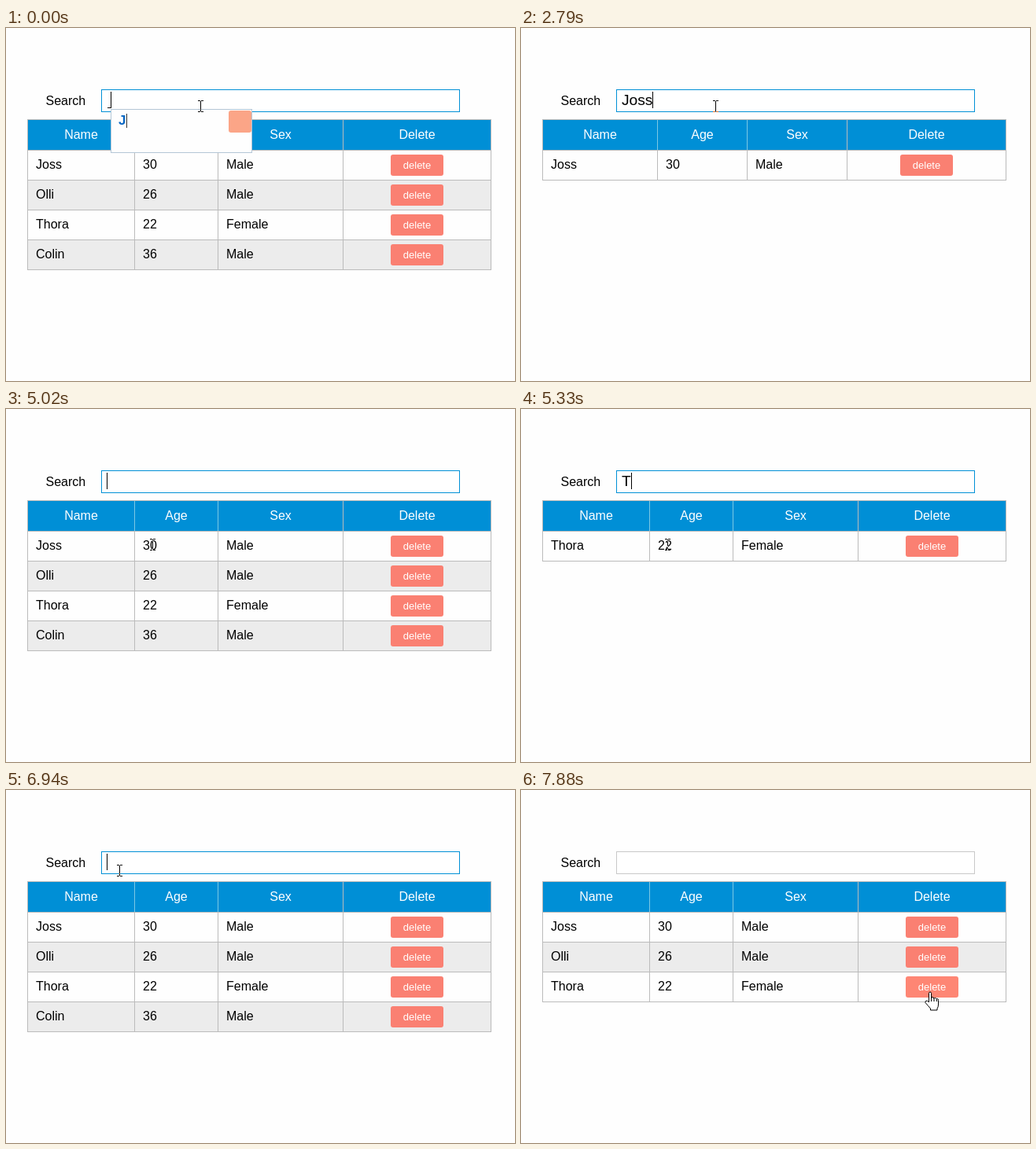
An HTML page for the animation above (8 s loop, 647 by 449 pixels).

```html
<!DOCTYPE html>
<html lang="en">
<head>
<meta charset="utf-8">
<title>Table search</title>
<style>
html, body { margin: 0; width: 100%; height: 100%; overflow: hidden; background: #fefefe; }
svg { display: block; font: 16px "Liberation Sans", Arial, sans-serif; }
.query { font-size: 19.2px; white-space: pre; }
.button { font-size: 13px; fill: #fff; text-anchor: middle; }
.head { fill: #fff; text-anchor: middle; }
.beam { mix-blend-mode: difference; fill: #fff; }
</style>
</head>
<body>
<svg id="stage" width="647" height="449"></svg>
<script>
const LOOP = 8000;
const stage = document.getElementById('stage');
const people = [
  ['Joss', 30, 'Male'],
  ['Olli', 26, 'Male'],
  ['Thora', 22, 'Female'],
  ['Colin', 36, 'Male']
];
const WIDE = [27, 163, 269, 428, 616];
const NARROW = [27, 173, 287, 414, 616];

// Each step overrides part of the state before it.
const steps = [
  [0, { text: ' ', pending: true, popup: true, caret: true, focus: true, selected: false,
        removed: false, cursor: 'beam', x: 247, y: 99 }],
  [410, { text: 'J', popup: false }],
  [560, { pending: false }],
  [840, { text: 'Jo' }],
  [1150, { text: 'Jos' }],
  [1710, { caret: false }],
  [2230, { caret: true }],
  [2790, { text: 'Joss' }],
  [3320, { caret: false }],
  [3460, { text: 'Jos', caret: true }],
  [3600, { text: 'Jo' }],
  [3740, { text: 'J' }],
  [3890, { text: '' }],
  [4170, { x: 243, y: 108 }],
  [4310, { x: 226, y: 140 }],
  [4450, { x: 208, y: 170, caret: false }],
  [4590, { x: 196, y: 185 }],
  [4730, { x: 190, y: 180 }],
  [4880, { x: 187, y: 175 }],
  [5020, { x: 186, y: 172, caret: true }],
  [5330, { text: 'T' }],
  [5480, { x: 180, y: 150 }],
  [5620, { x: 168, y: 118 }],
  [5760, { x: 155, y: 96 }],
  [5890, { x: 145, y: 90 }],
  [6030, { x: 142, y: 88 }],
  [6150, { x: 137, y: 84 }],
  [6270, { x: 131, y: 80, selected: true, caret: false }],
  [6390, { x: 110, y: 88 }],
  [6510, { x: 94, y: 96 }],
  [6940, { x: 144, y: 102, text: '', selected: false, caret: true }],
  [7070, { cursor: 'arrow', x: 220, y: 135 }],
  [7210, { x: 330, y: 180 }],
  [7340, { x: 430, y: 230 }],
  [7480, { cursor: 'hand', x: 500, y: 278, caret: false }],
  [7610, { x: 518, y: 285 }],
  [7750, { x: 521, y: 282, focus: false }],
  [7880, { x: 520, y: 257, removed: true }]
];

const pen = document.createElement('canvas').getContext('2d');
pen.font = '19.2px "Liberation Sans", Arial, sans-serif';
const widthOf = text => pen.measureText(text).width;

const rect = (x, y, w, h, fill, more = '') =>
  `<rect x="${x}" y="${y}" width="${w}" height="${h}" fill="${fill}" ${more}/>`;
const label = (x, y, text, more = '') => `<text x="${x}" y="${y}" ${more}>${text}</text>`;

function table(rows, cols, hovered) {
  const right = cols[4];
  const mid = i => (cols[i] + cols[i + 1] + 1) / 2;
  const bottom = 155 + rows.length * 38;
  let out = rect(27, 116, right - 26, 39, '#008fd6');
  ['Name', 'Age', 'Sex', 'Delete'].forEach((name, i) => out += label(mid(i), 141, name, 'class="head"'));
  rows.forEach((row, i) => {
    const y = 155 + i * 38;
    if (i % 2) out += rect(27, y, right - 27, 38, '#ececec');
    row.forEach((cell, j) => out += label(cols[j] + 11, y + 24, cell));
    out += rect(mid(3) - 33.5, y + 6, 67, 27, i === hovered ? '#fe8674' : '#fa8072', 'rx="3"');
    out += label(mid(3), y + 24, 'delete', 'class="button"');
  });
  for (let y = 155; y <= bottom; y += 38) out += rect(27, y, right - 26, 1, '#bbb');
  out += rect(27, 116, right - 26, 1, '#bbb');
  cols.forEach((x, i) => {
    out += rect(x, 116, 1, bottom - 115, '#bbb');
    if (i === 1 || i === 2) out += rect(x, 117, 1, 38, '#7cc8e4');
  });
  return out;
}

function search(s) {
  const w = widthOf(s.text);
  let out = label(50.5, 98, 'Search');
  out += rect(121.5, 78.5, 455, 28, '#fff', `stroke="${s.focus ? '#0090d6' : '#c8c8c8'}"`);
  if (s.selected) out += rect(128, 81, w, 21, '#3297fd');
  out += label(128, 98, s.text, `class="query" fill="${s.selected ? '#fff' : '#000'}"`);
  if (s.popup) out += rect(129, 101, 5, 1, '#000');
  if (s.caret) out += rect(Math.round(128 + w), 81, 1, 21, '#000');
  return out;
}

const popup = () =>
  rect(133.5, 103.5, 179, 55, '#fefefe', 'stroke="#b4c6d6"') +
  label(143, 123, 'J', 'font-size="17" font-weight="bold" fill="#0a67c4"') +
  rect(153, 109, 1, 18, '#333') +
  rect(283, 105, 29, 28, '#fba587', 'rx="3"');

const shapes = {
  arrow: '<path d="M.5.5V17L4.5 13.5 7 19.5 9.5 18.5 7 12.5H12Z" fill="#fff" stroke="#000"/>',
  hand: '<path d="M-1.5 12V1.5Q-1.5 0 0 0T1.5 1.5V8Q1.5 6.5 3 6.5T5 8.5Q5 7.5 6.5 7.5T8.5 9.5Q8.5 8.5 9.5 8.5' +
    'T10.5 10.5V16Q10.5 19 9 21V23H.5V21Q-2 18-6 13.5-6.5 11-4 11-2.5 11.5-1.5 13ZM1.5 8V12M5 8.5V12M8.5 9.5V12" ' +
    'fill="#fff" stroke="#000"/>',
  beam: '<path class="beam" d="M-3-7H0V-6H1V-7H4V-6H1V7H4V8H1V7H0V8H-3V7H0V-6H-3Z"/>'
};

function cursor({ cursor, x, y }) {
  const shape = shapes[cursor];
  const move = `transform="translate(${x} ${y})"`;
  return shape.replace('<path', `<path ${move}`);
}

function draw(s) {
  const query = s.pending ? '' : s.text;
  const rows = people.filter(([name], i) => name.includes(query) && !(s.removed && i === 3));
  const hovered = s.cursor === 'hand' ? (s.removed ? 2 : 3) : -1;
  stage.innerHTML = rect(0, 0, 647, 449, '#fefefe') +
    table(rows, query[0] === 'J' ? NARROW : WIDE, hovered) +
    search(s) + (s.popup ? popup() : '') + cursor(s);
}

let shown = -1;
function tick(now) {
  const t = now % LOOP;
  const count = steps.filter(([at]) => at <= t).length;
  if (count !== shown) {
    shown = count;
    draw(Object.assign({}, ...steps.slice(0, count).map(step => step[1])));
  }
  requestAnimationFrame(tick);
}
tick(performance.now());
</script>
</body>
</html>
```
